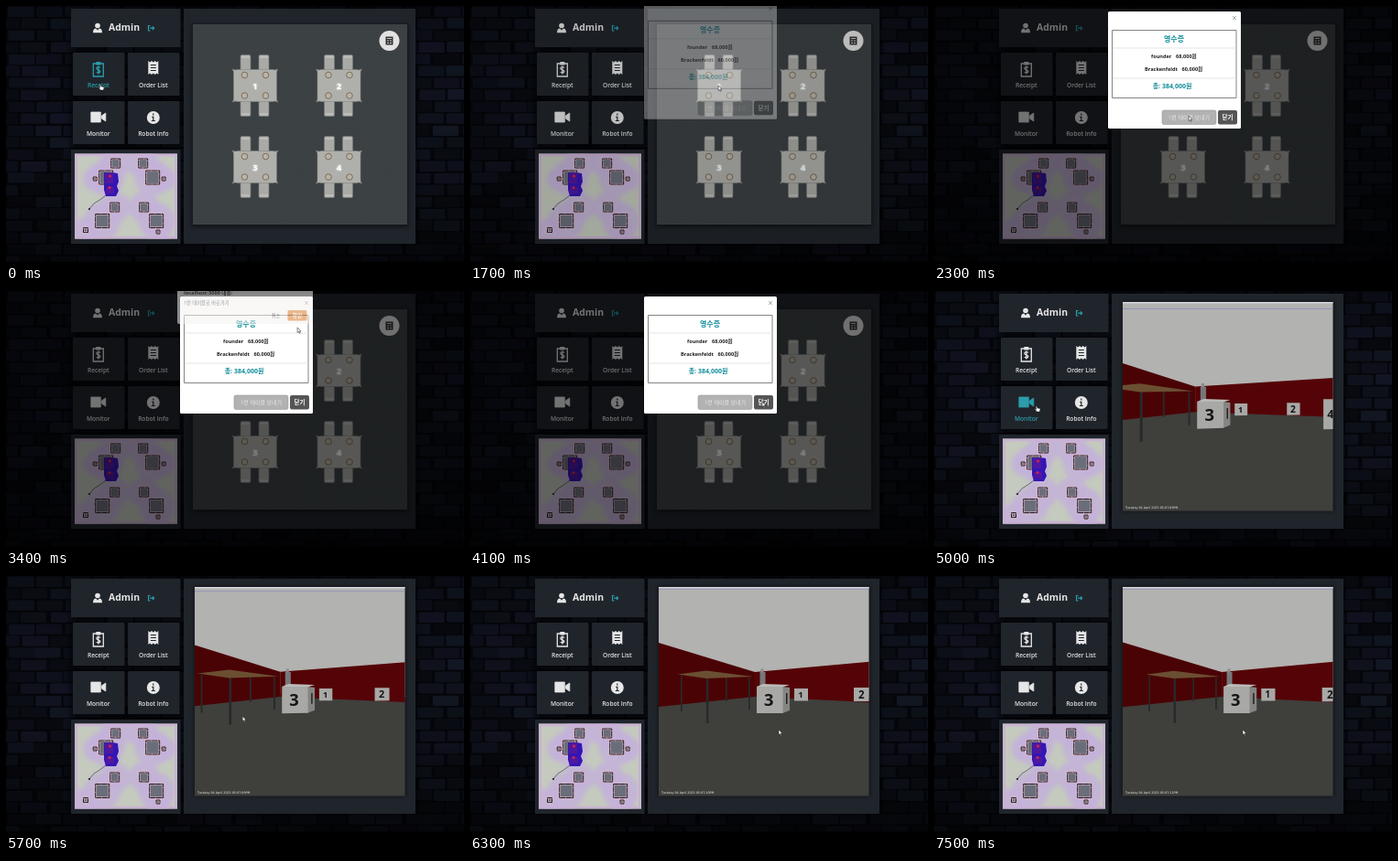
Write an HTML page that moves like this. It is 500 by 281 pixels and loops after 7.6 s.

```html
<!DOCTYPE html>
<html lang="ko">
<head>
<meta charset="utf-8">
<title>Admin</title>
<style>
html, body { margin: 0; width: 100%; height: 100%; overflow: hidden; background: #05060a; }
svg { display: block; width: 100%; height: 100%; }
text { font: 700 5.6px 'Open Sans', 'Noto Sans CJK KR', sans-serif; text-anchor: middle; }
.l { text-anchor: start; }
.thin { font-weight: 400; font-size: 5.300px; }
.tile { color: #e6e6e6; }
.tile.on { color: #2b9dab; }
.tile text { fill: currentColor; font-size: 6.600px; font-weight: 600; }
</style>
</head>
<body>
<svg viewBox="0 0 500 281" preserveAspectRatio="none">
  <defs>
    <filter id="soft"><feGaussianBlur stdDeviation="2.2"/></filter>
    <filter id="glow" x="-1" y="-1" width="3" height="3"><feDropShadow dx="0" dy="0" stdDeviation="1" flood-color="#fff"/></filter>
    <clipPath id="mapClip"><path d="M75 161.5h112v93H75z"/></clipPath>
    <clipPath id="camClip"><path d="M206 12h229.500v228.500H206z"/></clipPath>
    <pattern id="weave" width="4" height="3" patternUnits="userSpaceOnUse">
      <path d="M0 .5h2M2 2h2" stroke="#484d50" stroke-width=".7"/>
    </pattern>
    <linearGradient id="dusk" x2="0" y2="1">
      <stop stop-opacity=".3"/><stop offset=".3" stop-opacity="0"/>
      <stop offset=".6" stop-opacity=".1"/><stop offset="1" stop-opacity=".6"/>
    </linearGradient>
  </defs>
  <g id="wall"></g>
  <path d="M0 0h500v281H0z" fill="url(#dusk)"/>
  <path d="M69 2h123v260H69zM192 2h257v260H192z" opacity=".3" filter="url(#soft)"/>
  <path d="M71 3h119.500v42H71zM71 157h119.500v103H71zM194 3h253v257H194z" fill="#20252b"/>

  <g fill="#e6e6e6">
    <circle cx="100" cy="21.500" r="2.800"/>
    <path d="M95 29.300c0-3.500 1.500-4.800 3.200-4.800l1.800 2 1.800-2c1.800 0 3.200 1.300 3.200 4.800z"/>
    <text x="129" y="27.200" style="font-size:10.400px">Admin</text>
  </g>
  <path d="M157.500 21.500h-2v5.500h2M157 24.200h4.500M159.800 22.300l1.900 1.900-1.900 1.900" fill="none" stroke="#2b9dab" stroke-width="1.200"/>
  <g id="tiles"></g>
  <g id="map" clip-path="url(#mapClip)"></g>

  <g id="floor">
    <path d="M203 20h236v222H203z" opacity=".45" filter="url(#soft)"/>
    <path d="M204 20h234v219H204z" fill="#3a3f42"/>
    <path d="M204 20h234v219H204z" fill="url(#weave)" opacity=".55"/>
    <g id="tables"></g>
    <path id="focus" d="M248 69.500h48v35h-48z" fill="none" stroke="#4f86c6"/>
    <circle cx="418.500" cy="38" r="11" fill="#e2e2e2"/>
    <path d="M414.500 33.500h8v9h-8z" fill="#333"/>
    <path d="M416 35.500h5M416 38h2M419 38h2M416 40.500h2M419 40.500h2" stroke="#ddd" stroke-width=".9"/>
  </g>

  <g id="cam">
    <path d="M205 11h232v230H205z" opacity=".4" filter="url(#soft)"/>
    <g clip-path="url(#camClip)">
      <path d="M206 12h230v121H206z" fill="#b2b2b0"/>
      <path d="M206 130h230v111H206z" fill="#3f3f3c"/>
      <g id="scene"></g>
      <path d="M206 12.800h230" stroke="#d8d8e0" stroke-width="1.600"/>
      <path id="scan" d="M206 0h230" stroke="#8d90bb" stroke-width=".8"/>
      <text id="stamp" class="l" x="209" y="238.300" fill="#eee" style="font:3.300px 'DejaVu Sans',sans-serif"></text>
    </g>
  </g>

  <path id="shade" d="M0 0h500v281H0z"/>
  <g id="modal">
    <rect x="190" y="6" width="145" height="128" rx="1.500" fill="#fff"/>
    <path d="M326 11l4 4m0-4l-4 4" stroke="#999" stroke-width=".8"/>
    <path d="M194.500 26.500h135.500v74H194.500z" fill="none" stroke="#777" stroke-width=".9"/>
    <path d="M195 46h135M195 79h135" stroke="#d8d8d8" stroke-width=".7"/>
    <g fill="#222">
      <text x="262" y="39" fill="#0f8c99" style="font-size:8px">영수증</text>
      <text class="l" x="237" y="57.200">founder</text>
      <text class="l" x="264" y="57.200">68,000원</text>
      <text class="l" x="230" y="71.200">Brackenfeldt</text>
      <text class="l" x="270.500" y="71.200">60,000원</text>
      <text x="260" y="90.300" fill="#0f8c99" style="font-size:7px">총: 384,000원</text>
    </g>
    <rect x="249" y="114" width="59" height="15.500" rx="2" fill="#b2b2b2" stroke="#999" stroke-width=".6"/>
    <text class="thin" x="278.500" y="124" fill="#e8e8e8" style="font-size:6px">1번 테이블 보내기</text>
    <rect x="310" y="114" width="21" height="15.500" rx="2" fill="#555"/>
    <text x="320.500" y="124" fill="#fff" style="font-size:6.500px">닫기</text>
  </g>
  <g id="ask">
    <rect x="187" y="-6" width="148" height="42" rx="2" fill="#f4f3f2"/>
    <g fill="#444">
      <text class="l" x="194" y="4">localhost:3000 내용:</text>
      <text class="l thin" x="194" y="14.500">1번 테이블로 바로가기</text>
      <text class="thin" x="294.500" y="29">취소</text>
    </g>
    <rect x="307.500" y="21" width="21" height="11.500" rx="1.500" fill="#dd7a2c"/>
    <text x="318" y="29" fill="#fff">확인</text>
  </g>
  <g id="cursor" stroke="#111" stroke-width=".5" fill="#fff">
    <path id="arrow" d="M0 0v5.500l1.300-1.100.9 2 .9-.4-.9-1.900h1.700z"/>
    <path id="hand" d="M0 0c-.9 0-.9.5-.7 1l.5 2.400-1-.6c-.6 0-.6.5-.3.9L.2 6h3.300l.6-3.400L1 2 .6.400z"/>
  </g>
</svg>
<script>
const LOOP = 7600;
const $ = id => document.getElementById(id);
const clamp = x => Math.max(0, Math.min(1, x));
const mix = (a, b, k) => a + (b - a) * k;
const show = (id, on) => $(id).style.display = on ? '' : 'none';
let seed = 7;
const rnd = () => (seed = seed * 16807 % 2147483647) / 2147483647;
const box = (x, y, w, h, extra) => `<rect x="${x}" y="${y}" width="${w}" height="${h}" ${extra}/>`;

// brick wall
let s = '';
for (let r = 0; r < 22; r++)
  for (let c = -1; c < 17; c++)
    s += box(c * 31 + (r % 2) * 15 + rnd() * 3, r * 13 + rnd(), 28.5, 11.4,
      `rx="1.5" fill="hsl(${220 + rnd() * 14} 32% ${4.5 + rnd() * 6}%)"`);
$('wall').innerHTML = s + box(0, 279.5, 500, 2, '');

// menu tiles, icons drawn around 0,0
const line = 'fill="none" stroke="currentColor" stroke-width="1.3"';
const cut = 'fill="none" stroke="#20252b" stroke-width="1.2"';
const menu = [
  ['Receipt', `<path d="M-5.500-6h11V8h-11z" ${line}/><path d="M-2.500-8h5v3.500h-5z" fill="currentColor"/>
    <path d="M2-1.500C1-3-2-2.500-2-.8S2 .8 2 2.600-1 4.500-2 3M0-3.500v9" ${line}/>`],
  ['Order List', `<path d="M-5.500-9l1.800 1.500L-1.800-9 0-7.500 1.800-9l1.900 1.500L5.500-9V6L3.700 4.500 1.800 6 0 4.500-1.800 6l-1.900-1.500L-5.500 6z" fill="currentColor"/>
    <path d="M-3-4.500h6M-3-1.500h6M-3 1.500h6" ${cut}/>`],
  ['Monitor', '<path d="M-8-6H2.500V5H-8zM3.500-2L8-5V4L3.500 1z" fill="currentColor" stroke="currentColor" stroke-linejoin="round" stroke-width=".8"/>'],
  ['Robot Info', `<circle r="7" fill="currentColor"/><path d="M0-4.500v2M-1.500-.7H0v4M-2 3.500h4" ${cut}/>`]
].map(([name, icon], i) => ({ name, icon, x: 73 + i % 2 * 60, y: 51 + (i >> 1) * 53 }));
$('tiles').innerHTML = menu.map(({ name, icon, x, y }) =>
  box(x - 1, y - 1, 59, 50, 'opacity=".25" filter="url(#soft)"') +
  `<g class="tile" transform="translate(${x} ${y})">${box(0, 0, 56.5, 47, 'rx="1" fill="#20252b"')}
   <g transform="translate(27.8 18)">${icon}</g><text x="27.8" y="37.800">${name}</text></g>`).join('');
const tiles = [...document.querySelectorAll('.tile')];

// robot map: obstacles mirrored about the middle, plus two odd ones
const blocks = [[87, 245, 5], [166, 247, 4]];
for (const [dx, y, d] of [[15, 172, 10], [25.5, 187.5, 15], [16, 220, 10], [29.5, 235, 15], [37.5, 189, 4]])
  blocks.push([134.7 - dx, y, d], [134.7 + dx, y, d]);
s = box(75, 161, 113, 94, 'fill="#c4cabd"') + '<g filter="url(#soft)">';
for (const [x, y, d] of blocks)
  s += `<circle cx="${x}" cy="${y}" r="${d * .6 + 11}" fill="#c4b2da" opacity=".85"/>`;
s += '</g><path d="M75.500 162h111v92h-111z" fill="none" stroke="#cbb0d6" stroke-width="5" opacity=".8"/>';
for (const [x, y, d] of blocks)
  s += box(x - d / 2, y - d / 2, d, d, 'fill="#6a6e7a" stroke="#dcb4c6" stroke-width="2.2"') +
    box(x - d / 2, y - d / 2, d, d, 'fill="none" stroke="#1b1b22" stroke-dasharray="6 .4"');
s += `<path d="M107 182h9l6 1 1 9-2 5 2 5-3 6h-11l-2-7z" fill="#3416b4"/>
  <path d="M108 182h9v12h-9zM109 198h9v7h-9z" fill="#5018a0"/>
  <circle cx="113.500" cy="186" r="1.500" fill="#e0243c"/><circle cx="113" cy="198.500" r="1.500" fill="#e0243c"/>
  <path d="M109 207q-6 5-13 9l-5 6" fill="none" stroke="#44454e" stroke-width=".7"/><circle cx="91" cy="222" r=".9"/>`;
$('map').innerHTML = s;

// dining tables
s = '';
for (let i = 0; i < 4; i++) {
  s += `<g transform="translate(${272 + i % 2 * 91.5} ${87 + (i >> 1) * 89})">`;
  for (const x of [-16, 4]) for (const y of [-33.5, 17])
    s += box(x, y, 11, 16.5, 'rx="1.5" fill="#a9a9a6" stroke="#7d7d7b" stroke-width=".6"') +
      box(x + 1, y < 0 ? y + 1 : y + 13, 9, 2.5, 'fill="#bcbcb9"');
  s += '<path d="M-25-18q3 1.500 6 .5h38q3 1 6-.5-2 2-1.500 5v26q-.5 3 1.500 5-3-1.500-6-.5h-38q-3-1-6 .5 2-2 1.500-5v-26q.5-3-1.500-5z" fill="#afafac" stroke="#858583" stroke-width=".5"/>';
  for (const x of [-11.5, 11.5]) for (const y of [-11.5, 11])
    s += `<circle cx="${x}" cy="${y}" r="3.3" fill="#b9b4a8" stroke="#75664f" stroke-width=".9"/>`;
  s += `<text y="3.500" fill="#fff" filter="url(#glow)" style="font-size:9.500px">${i + 1}</text></g>`;
}
$('tables').innerHTML = s;

// camera view: shapes in screen space, turned by a yaw about the lens
const LENS = 140, CX = 320.5, HORIZON = 125;
function turn([x, y], yaw) {
  const u = x - CX, c = Math.cos(yaw), n = Math.sin(yaw), scale = LENS / (LENS * c - u * n);
  return [CX + scale * (u * c + LENS * n), HORIZON + scale * (y - HORIZON), scale];
}
const shapes = [], marks = [];
const quad = (fill, x1, y1, x2, y2, x3, y3, x4, y4) => shapes.push([fill, [[x1, y1], [x2, y2], [x3, y3], [x4, y4]]]);
const rect = (fill, x, y, w, h) => quad(fill, x, y, x + w, y, x + w, y + h, x, y + h);
quad('#4a0305', 150, 56, 311, 105, 311, 132, 150, 149);
quad('#540406', 311, 105, 500, 88, 500, 141, 311, 132);
rect('#77777a', 316.5, 105, 6, 16);
rect('#8c8c8c', 317.5, 101.5, 3, 4);
for (const [x, y, end] of [[230, 109, 148], [279, 109, 137], [304, 111, 146], [258, 111, 161]])
  rect('#28292a', x, y, end > 150 ? 2.4 : 1.7, end - y);
quad('#6b4f32', 227, 107.5, 258, 103.5, 309, 110, 258, 112);
quad('#858583', 341, 121, 349, 122, 349, 147, 341, 150);
quad('#bbbbb9', 313, 121, 320, 118, 349, 119, 341, 121.5);
rect('#222', 345, 128, 1.5, 12);
for (const [n, x, y, w, h] of [[3, 313, 121, 28.5, 29], [1, 354, 123, 15, 13.5], [2, 419, 122, 18, 15], [4, 471, 117, 24, 39]]) {
  rect('#a8a8a6', x, y, w, h);
  marks.push([n, [x + w * .46, y + h / 2], w * .64]);
}
$('scene').innerHTML = shapes.map(([fill]) => `<polygon fill="${fill}"/>`).join('') +
  marks.map(([n, , size]) => `<text y="${size * .36}" fill="#161616" style="font-size:${size}px">${n}</text>`).join('');
const polys = [...$('scene').querySelectorAll('polygon')];
const nums = [...$('scene').querySelectorAll('text')];

// pointer stops: arrive, leave, x, y
const stops = [[0, 250, 103, 86], [1400, 1700, 271, 87], [2200, 2400, 278, 120], [3000, 3250, 318, 27],
  [3900, 4250, 319, 121], [4700, 5250, 112, 126], [6000, LOOP, 337, 168]];
function pointer(t) {
  const i = stops.findIndex(p => t <= p[1]), b = stops[i], a = stops[i - 1] || b;
  const k = clamp((t - a[1]) / (b[0] - a[1] || 1)), e = k * k * (3 - 2 * k);
  return [mix(a[2], b[2], e), mix(a[3], b[3], e)];
}

function drawCamera(t) {
  const sweep = clamp((t - 5000) / 1300);
  const yaw = -.18 * (1 - sweep) + .022 * clamp((t - 6300) / 1200);
  shapes.forEach(([, pts], i) => polys[i].setAttribute('points', pts.map(p => turn(p, yaw).slice(0, 2)).join(' ')));
  marks.forEach(([, p], i) => {
    const [x, y, k] = turn(p, yaw);
    nums[i].setAttribute('transform', `translate(${x} ${y}) scale(${k})`);
  });
  $('scan').setAttribute('transform', `translate(0 ${mix(19.5, 14.2, sweep)})`);
  const sec = 9 + Math.floor((t - 5000) / 1200);
  $('stamp').textContent = `Tuesday 04 April 2023 05:07:${String(sec).padStart(2, '0')}PM`;
}

function draw(t) {
  const [x, y] = pointer(t);
  const hover = menu.map(m => x > m.x && x < m.x + 56 && y > m.y && y < m.y + 47);
  hover.forEach((on, i) => tiles[i].classList.toggle('on', on));
  const hand = hover.includes(true), live = t >= 5000;
  $('cursor').setAttribute('transform', `translate(${x} ${y})`);
  show('hand', hand);
  show('arrow', !hand);
  show('floor', !live);
  show('cam', live);
  show('focus', t > 4250);

  const closing = t > 4250, since = t - (closing ? 4250 : 1650);
  let fade = clamp(since / 150), slide = 1 - (1 - clamp(since / 300)) ** 1.7;
  if (closing) { fade = 1 - fade; slide = 1 - slide; }
  $('shade').style.opacity = fade * .5;
  $('modal').style.opacity = fade;
  $('modal').setAttribute('transform', `translate(0 ${-14 * (1 - slide)})`);
  $('ask').style.opacity = Math.min(clamp((t - 2350) / 100), clamp((3460 - t) / 110));
  if (live) drawCamera(t);
}
const start = performance.now();
function tick() {
  draw((performance.now() - start) % LOOP);
  requestAnimationFrame(tick);
}
tick();
</script>
</body>
</html>
```
